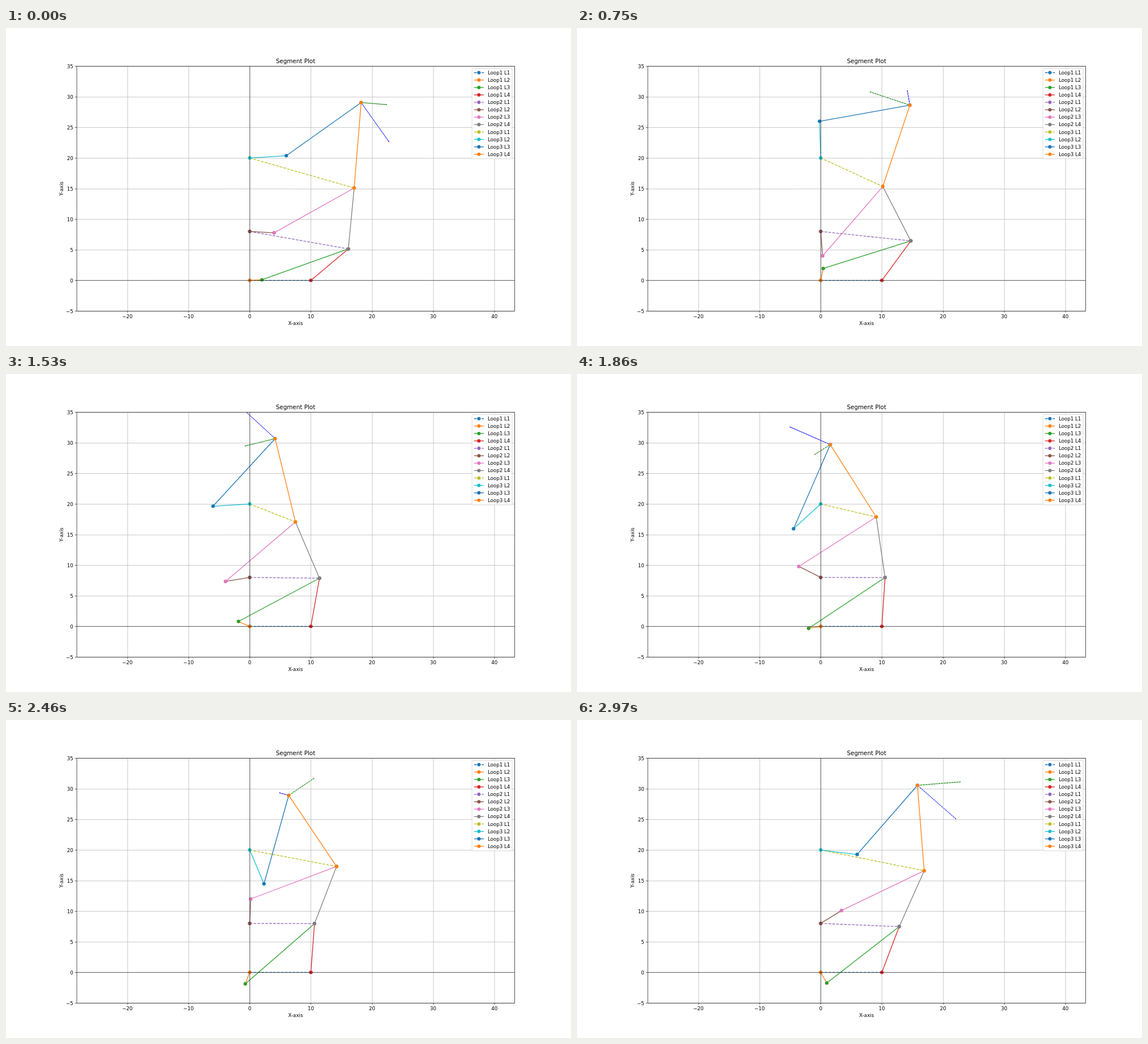
Animation of 998x561 px, one loop 3000 ms. Source, as an HTML page with a canvas:

```html
<!DOCTYPE html>
<html lang="en">
<head>
<meta charset="utf-8">
<title>Segment Plot</title>
<style>
html, body { margin: 0; width: 100%; height: 100%; overflow: hidden; background: #fff; }
canvas { display: block; }
</style>
</head>
<body>
<canvas width="998" height="561"></canvas>
<script>
const ctx = document.querySelector('canvas').getContext('2d');
// Layout is in a 1600 x 900 figure at 100 dpi, scaled to the stage.
const PT = 100 / 72, UNIT = 17.325, EM = 10 * PT;
const BOX = { l: 200, r: 1440, t: 108, b: 801 };
const COLORS = ['#1f77b4', '#ff7f0e', '#2ca02c', '#d62728', '#9467bd', '#8c564b',
  '#e377c2', '#7f7f7f', '#bcbd22', '#17becf', '#1f77b4', '#ff7f0e'];
const FRAME_MS = 30, FRAMES = 100, STEP = 2 * Math.PI / 102;
const LOOPS = [
  { pivot: [0, 0], crank: 2, rocker: 8, speed: 0.85 },
  { pivot: [0, 8], crank: 4, rocker: 10, speed: -0.93 },
  { pivot: [0, 20], crank: 6, rocker: 14, speed: 1 },
];
const COUPLER = 15;

const px = x => 820 + (x - 7.5) * UNIT;
const py = y => BOX.b - (y + 5) * UNIT;
const snap = v => Math.floor(v + 0.5) + 0.5;
const sub = (a, b) => [a[0] - b[0], a[1] - b[1]];
const along = (p, u, k) => [p[0] + u[0] * k, p[1] + u[1] * k];
const dot = (a, b) => a[0] * b[0] + a[1] * b[1];
const perp = v => [-v[1], v[0]];

function line(x1, y1, x2, y2, color, width, dashed) {
  ctx.strokeStyle = color;
  ctx.lineWidth = width;
  ctx.setLineDash(dashed ? [3.7 * width, 1.6 * width] : []);
  ctx.beginPath();
  ctx.moveTo(x1, y1);
  ctx.lineTo(x2, y2);
  ctx.stroke();
}

function dot2d(x, y, color) {
  ctx.fillStyle = color;
  ctx.beginPath();
  ctx.arc(x, y, 3.5 * PT, 0, 7);
  ctx.fill();
}

function text(str, x, y, align, size = 10) {
  ctx.font = `${size * PT}px "DejaVu Sans", sans-serif`;
  ctx.textAlign = align;
  ctx.fillStyle = '#000';
  ctx.fillText(str, x, y);
}

function segment(p, q, index) {
  const [x1, y1, x2, y2] = [px(p[0]), py(p[1]), px(q[0]), py(q[1])];
  line(x1, y1, x2, y2, COLORS[index], 1.5 * PT, index % 4 === 0);
  dot2d(x1, y1, COLORS[index]);
  dot2d(x2, y2, COLORS[index]);
}

// Thin closed arrow outline, dashed out and back from its tip.
function arrow(p, v, color) {
  const len = Math.hypot(...v), head = 0.1, w = 0.0005;
  const u = [v[0] / len, v[1] / len], n = perp(u);
  const shape = [[len + head, 0], [len, -head / 2], [len, -w], [0, -w], [0, w], [len, w], [len, head / 2]];
  ctx.beginPath();
  for (const [a, b] of shape) {
    const q = along(along(p, u, a), n, b);
    ctx.lineTo(px(q[0]), py(q[1]));
  }
  ctx.closePath();
  ctx.fillStyle = ctx.strokeStyle = color;
  ctx.lineWidth = PT;
  ctx.setLineDash([3.7 * PT, 1.6 * PT]);
  ctx.fill();
  ctx.stroke();
}

// Point at distance a from p and b from q, left of p -> q.
function joint(p, a, q, b) {
  const v = sub(q, p), d = Math.hypot(...v), u = [v[0] / d, v[1] / d];
  const m = (d * d + a * a - b * b) / (2 * d);
  return along(along(p, u, m), perp(u), Math.sqrt(a * a - m * m));
}

function solve(step) {
  let base = [10, 0];
  return LOOPS.map(({ pivot, crank, rocker, speed }) => {
    const angle = speed * step * STEP;
    const pin = along(pivot, [Math.cos(angle), Math.sin(angle)], crank);
    const end = joint(pin, COUPLER, base, rocker);
    const pose = { pivot, base, pin, end };
    base = end;
    return pose;
  });
}

function velocities({ pivot, base, pin, end }) {
  const pinV = perp(sub(pin, pivot)), rod = sub(end, pin), swing = perp(sub(end, base));
  const rate = dot(pinV, rod) / dot(swing, rod);
  const endV = [swing[0] * rate, swing[1] * rate];
  return { endV, rodV: sub(endV, pinV) };
}

function axes() {
  const thin = 0.8 * PT, tick = 3.5 * PT;
  const label = n => String(n).replace('-', '\u2212');
  for (let x = -20; x <= 40; x += 10) {
    const X = snap(px(x));
    line(X, BOX.t, X, BOX.b, '#b0b0b0', thin);
    line(X, BOX.b, X, BOX.b + tick, '#000', thin);
    text(label(x), px(x), 821.8, 'center');
  }
  for (let y = -5; y <= 35; y += 5) {
    const Y = snap(py(y));
    line(BOX.l, Y, BOX.r, Y, '#b0b0b0', thin);
    line(BOX.l - tick, Y, BOX.l, Y, '#000', thin);
    text(label(y), BOX.l - 7 * PT, py(y) + 5.3, 'right');
  }
}

function labels() {
  text('Segment Plot', 820, 99.7, 'center', 12);
  text('X-axis', 820, 841, 'center');
  ctx.save();
  ctx.translate(161.3, 454.5);
  ctx.rotate(-Math.PI / 2);
  text('Y-axis', 0, 0, 'center');
  ctx.restore();
}

function legend() {
  const left = 1319.7, top = 114.9, x = left + 0.4 * EM;
  ctx.setLineDash([]);
  ctx.beginPath();
  ctx.roundRect(left, top, 113.4, 255.5, 0.2 * EM);
  ctx.fillStyle = 'rgba(255,255,255,.8)';
  ctx.strokeStyle = 'rgba(204,204,204,.8)';
  ctx.lineWidth = PT;
  ctx.fill();
  ctx.stroke();
  COLORS.forEach((color, i) => {
    const base = 131.2 + 21 * i, mid = base - 0.35 * EM;
    line(x, mid, x + 2 * EM, mid, color, 1.5 * PT, i % 4 === 0);
    dot2d(x + EM, mid, color);
    text(`Loop${(i >> 2) + 1} L${i % 4 + 1}`, x + 2.8 * EM, base, 'left');
  });
}

function clipped(paint) {
  ctx.save();
  ctx.beginPath();
  ctx.rect(BOX.l, BOX.t, BOX.r - BOX.l, BOX.b - BOX.t);
  ctx.clip();
  paint();
  ctx.restore();
}

function draw(step) {
  const poses = solve(step), last = poses[2], { endV, rodV } = velocities(last);
  ctx.setTransform(998 / 1600, 0, 0, 561 / 900, 0, 0);
  ctx.fillStyle = '#fff';
  ctx.fillRect(0, 0, 1600, 900);
  clipped(() => {
    arrow(last.end, rodV, '#0000ff');
    arrow(last.end, endV, '#008000');
  });
  axes();
  clipped(() => {
    poses.forEach(({ pivot, base, pin, end }, i) => {
      segment(pivot, base, 4 * i);
      segment(pivot, pin, 4 * i + 1);
      segment(pin, end, 4 * i + 2);
      segment(base, end, 4 * i + 3);
    });
    const X = snap(px(0)), Y = snap(py(0));
    line(BOX.l, Y, BOX.r, Y, '#000', 0.9);
    line(X, BOX.t, X, BOX.b, '#000', 0.9);
  });
  ctx.setLineDash([]);
  ctx.strokeStyle = '#000';
  ctx.lineWidth = 0.8 * PT;
  ctx.strokeRect(BOX.l + 0.5, BOX.t + 0.5, BOX.r - BOX.l, BOX.b - BOX.t);
  labels();
  legend();
}

const start = performance.now();
function tick() {
  const elapsed = Math.max(0, performance.now() - start);
  draw(Math.floor(elapsed / FRAME_MS) % FRAMES + 1);
  requestAnimationFrame(tick);
}
tick();
</script>
</body>
</html>
```
